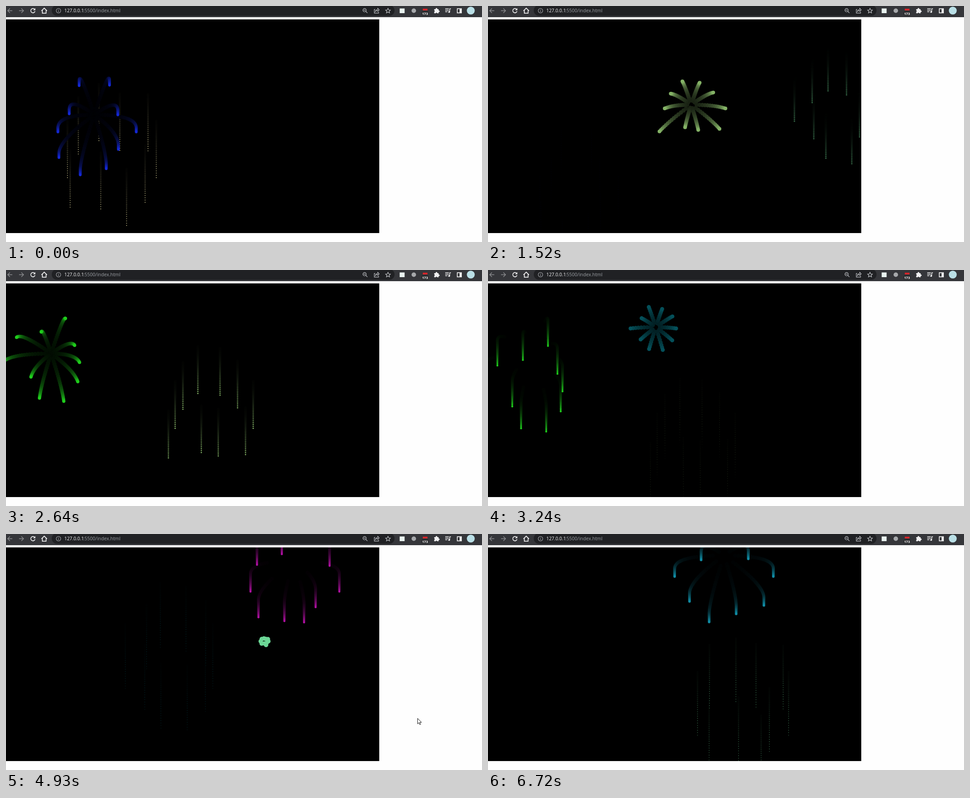
An HTML page with a canvas that plays this animation: 1061 px wide and 528 px high, repeating every 6.74 s.

```html
<!DOCTYPE html>
<html lang="en">
<head>
<meta charset="utf-8">
<title>Fireworks</title>
<style>
  html, body { margin: 0; width: 100%; height: 100%; overflow: hidden; background: #fefefe; }
  canvas, svg { position: absolute; left: 0; top: 0; display: block; }
  canvas { top: 30px; background: #000; }
  text { font-family: "Open Sans", "Noto Sans", sans-serif; }
  .line { fill: none; stroke-width: 1.4; }
</style>
</head>
<body>
<canvas id="sky" width="832" height="478"></canvas>
<svg width="1061" height="528" viewBox="0 0 1061 528">
  <rect width="1061" height="25" fill="#35363a"/>
  <rect x="102" y="-2" width="764" height="24" rx="12" fill="#202124"/>

  <!-- navigation -->
  <g class="line" stroke="#8b8c8f">
    <path d="M14 10.5H4M8.8 5.5l-5 5 5 5"/>
    <path d="M29 10.5h10M34.2 5.5l5 5-5 5"/>
  </g>
  <g class="line" stroke="#f1f1f2" style="stroke-width:1.7">
    <path d="M63.6 7.2a4.8 4.8 0 1 0 1.1 4.6"/>
    <path d="M79 10.8l6.2-6 6.2 6M81 9.5v6.7h8.4V9.5"/>
  </g>
  <path d="M65.4 4.8v4.8h-4.8z" fill="#f1f1f2"/>

  <!-- address bar -->
  <g class="line" stroke="#a9abaf" style="stroke-width:1.1">
    <circle cx="117" cy="10.5" r="5"/>
    <path d="M117 9.8v3.7M117 7.3v1.2"/>
  </g>
  <text x="130" y="14.3" font-size="10.3" fill="#f4f5f6">127.0.0.1</text>
  <text x="172.3" y="14.3" font-size="10.5" fill="#9da1a6">:5500/index.html</text>
  <g class="line" stroke="#c3c5c9" style="stroke-width:1.2">
    <circle cx="799.3" cy="9.3" r="3.7"/>
    <path d="M802 12l3.6 3.6M797.4 9.3h3.8"/>
    <path d="M823 7.5h-2v8.3h9.5v-2.5M823.5 12.2c.6-3.4 2.6-4.6 5.2-4.7V5.2l3.2 3.5-3.2 3.4V9.9c-2.2 0-3.8.7-5.2 2.3z"/>
    <path d="M851.5 5.3l1.6 3.5 3.8.4-2.8 2.5.8 3.8-3.4-2-3.4 2 .8-3.8-2.8-2.5 3.8-.4z"/>
  </g>

  <!-- extensions -->
  <rect x="877.5" y="5.5" width="11" height="10.5" fill="#e9f3f0"/>
  <circle cx="909" cy="10.5" r="5" fill="#a6a8ab"/>
  <rect x="929" y="6" width="10.5" height="4" fill="#d5262b"/>
  <rect x="926.5" y="11.5" width="15" height="11" rx="2" fill="#2b2c2f"/>
  <text x="934" y="20" font-size="7.6" font-weight="700" text-anchor="middle" fill="#fff">173</text>
  <g fill="#f1f1f2">
    <path d="M954.5 7h3.2a1.9 1.9 0 1 1 3.6 0h3v3.2a1.8 1.8 0 1 1 0 3.4v2.6h-3.2a1.7 1.7 0 0 0-3.2 0h-3.4V13a1.7 1.7 0 0 0 0-3.2z"/>
    <path d="M979 5.6h8v1.5h-8zM979 8.8h8v1.5h-8zM979 12h5v1.5h-5z"/>
    <path d="M988.3 5.6h3.5v1.5h-2v6.2a2 2 0 1 1-1.5-1.9z"/>
    <path d="M1005 5.3h11v10.9h-11zm1.6 1.6v7.7h4.4V6.9z" fill-rule="evenodd"/>
  </g>
  <circle cx="1036" cy="10.3" r="8.8" fill="#b9dfe6"/>

  <path id="cursor" d="M.5.5v12.3l2.8-2.7 2 4.5 1.9-.8-2-4.4h3.9z" fill="#fff" stroke="#111" visibility="hidden"/>
</svg>
<script>
const LOOP = 6740, STEP = 0.025, TRAIL = 32, FADE = 0.88;
const GRAVITY = 120, SPREAD = 0.7, LIFE = 2.1, SIZE = 5;
const ctx = document.getElementById('sky').getContext('2d');
const cursor = document.getElementById('cursor');

// Runs of evenly spaced picture changes: first, last, count
const runs = [
  [0, 150, 2], [290, 770, 5], [920, 1520, 6], [1640, 1890, 3], [2040, 2640, 6],
  [2760, 3360, 6], [3480, 4080, 6], [4200, 4810, 6], [4930, 5540, 6],
  [5690, 5810, 2], [5960, 6570, 6], [6720, 6720, 1]
];
const ticks = runs.flatMap(([a, b, n]) =>
  Array.from({ length: n }, (_, i) => n > 1 ? a + (b - a) * i / (n - 1) : a));

// keys: [ms, age in s]; reach: final distance of each spark, 36 degrees apart
const bursts = [];
const burst = (rgb, x, y, keys, reach) => bursts.push({ rgb, x, y, keys, reach });

burst([208, 200, 145], 234, 206.5, [[0, 1.72]],
  [101, 94, 112.5, 73.6, 112.5, 97, 90, 87, 64, 102]);
burst([20, 40, 212], 196.7, 243.3, [[0, 0.8]],
  [93.6, 66.5, 86.5, 101, 97.3, 81, 69, 109, 110, 65]);
burst([48, 94, 64], 780, 143.5, [[150, 0.03], [920, 0.78]],
  [90, 59.5, 100, 87, 66.5, 97, 71, 71.5, 62, 67]);
burst([132, 178, 102], 453, 221, [[2160, 1.01]],
  [98, 100, 65, 57, 112.5, 76, 72.5, 82, 78, 78]);
burst([31, 204, 28], 100.6, 187, [[2160, 0.08], [3240, 1.187]],
  [65.5, 76, 94.5, 87, 57.5, 112, 98.5, 74, 107, 67]);
burst([4, 80, 90], 374, 128, [[3240, 0.215]],
  [87, 87, 97, 93, 80, 108, 75, 97, 88, 88]);
burst([176, 16, 162], 642, 60, [[4930, 1.07]],
  [101, 59.5, 72.5, 69.5, 98, 97, 102, 88, 112, 98]);
burst([108, 214, 150], 577, 240, [[4930, 0.03], [5960, 1.133], [6720, 1.871]],
  [93, 62, 103, 60, 104, 110, 103, 79, 66, 100]);
burst([16, 138, 162], 526, 48, [[5960, 0.11], [6720, 0.885]],
  [110, 110, 88, 107, 95, 110, 63, 95, 95, 67]);

const pointer = [
  [3720, 1036, 470], [4200, 1030, 450], [4810, 925, 415], [4930, 917, 412],
  [5540, 1014, 466], [5810, 1032, 511], [5960, 1033, 525], [6080, 1033, 525]
];

const mix = (a, b, u) => a + (b - a) * u;

function ageAt(keys, t) {
  const i = keys.findIndex(k => k[0] > t);
  if (i > 0) {
    const [a, b] = [keys[i - 1], keys[i]];
    return mix(a[1], b[1], (t - a[0]) / (b[0] - a[0]));
  }
  const k = i === 0 ? keys[0] : keys[keys.length - 1];
  return k[1] + (t - k[0]) / 1000;
}

function drawBurst({ rgb, x, y, keys, reach }, t) {
  const now = ageAt(keys, t);
  for (let k = TRAIL; k >= 0; k--) {
    const age = now - k * STEP;
    if (age < 0.02 || age >= LIFE) continue;
    const spread = 1 - Math.max(0, 1 - age / SPREAD) ** 2;
    const fall = GRAVITY * age * age / 2;
    const radius = SIZE * (1 - age / LIFE);
    ctx.fillStyle = `rgb(${rgb.map(c => Math.round(c * FADE ** k))})`;
    reach.forEach((r, i) => {
      const a = i * Math.PI / 5;
      ctx.beginPath();
      ctx.arc(x + r * spread * Math.cos(a), y + r * spread * Math.sin(a) + fall, radius, 0, 7);
      ctx.fill();
    });
  }
}

function movePointer(t) {
  const i = pointer.findIndex(p => p[0] > t);
  cursor.setAttribute('visibility', i > 0 ? 'visible' : 'hidden');
  if (i < 1) return;
  const [a, b] = [pointer[i - 1], pointer[i]];
  const u = (t - a[0]) / (b[0] - a[0]);
  cursor.setAttribute('transform', `translate(${mix(a[1], b[1], u)} ${mix(a[2], b[2], u)})`);
}

function draw(t) {
  ctx.setTransform(1, 0, 0, 1, 0, 0);
  ctx.fillStyle = '#000';
  ctx.fillRect(0, 0, 832, 478);
  ctx.translate(0, -30);
  bursts.forEach(b => drawBurst(b, t));
  movePointer(t);
}

const start = performance.now();
let shown = -1;
function frame() {
  const t = (performance.now() - start) % LOOP;
  const tick = ticks.filter(v => v <= t).pop();
  if (tick !== shown) draw(shown = tick);
  requestAnimationFrame(frame);
}
frame();
</script>
</body>
</html>
```
